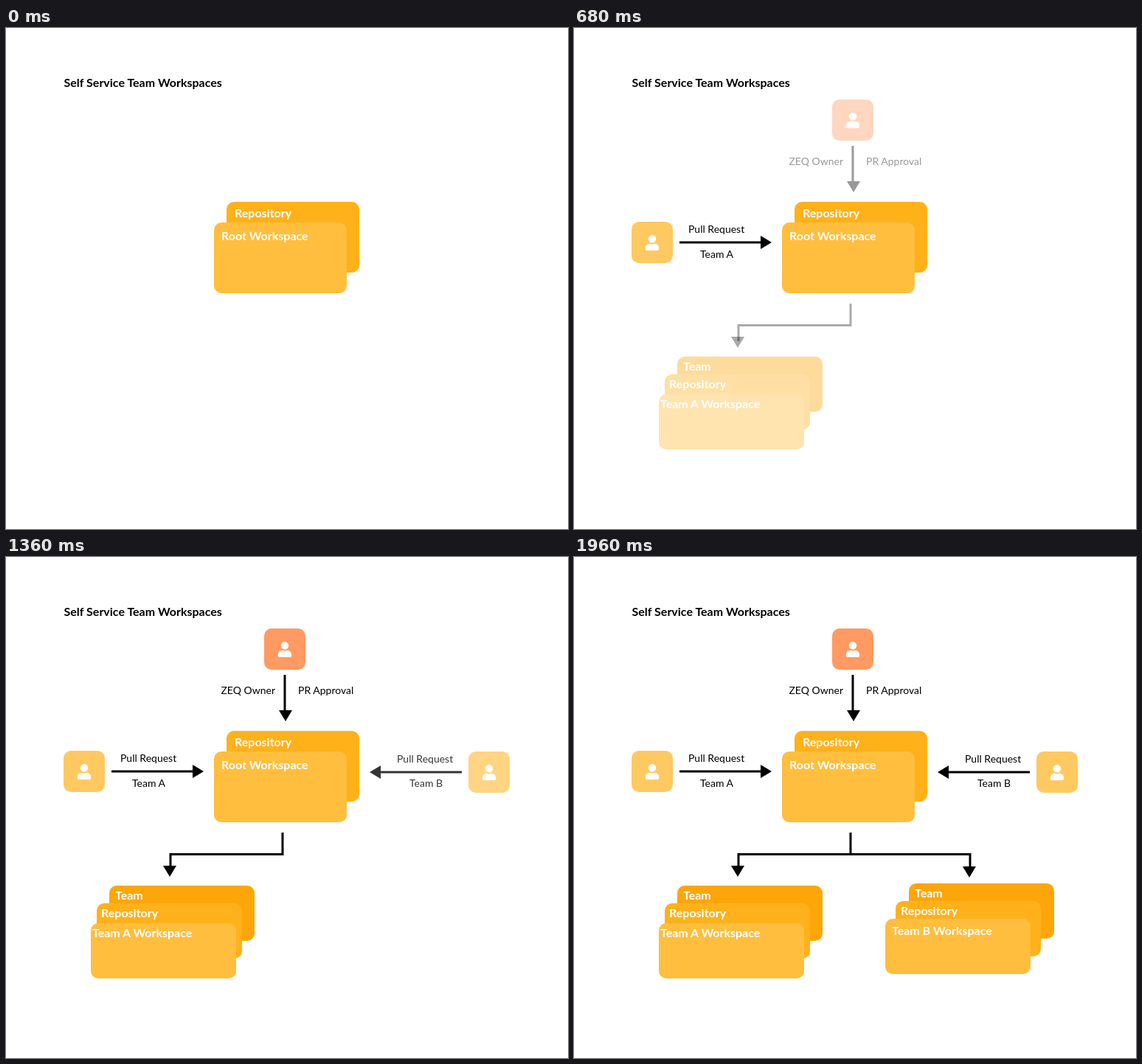
An HTML page for the animation above (2960 ms loop, 762 by 680 pixels).

```html
<!DOCTYPE html>
<html lang="en">
<head>
<meta charset="utf-8">
<title>Self Service Team Workspaces</title>
<style>
  html, body { margin: 0; width: 100%; height: 100%; overflow: hidden; background: #fff; }
  svg { display: block; width: 762px; height: 680px; }
  text { font: 14px Lato, sans-serif; }
  .bold { font-weight: 700; font-size: 16px; }
  .white { fill: #fff; }
  .line { fill: none; stroke: #000; stroke-width: 3; }
</style>
</head>
<body>
<svg viewBox="0 0 762 680">
  <defs>
    <g id="person" transform="translate(18.8 18) scale(.041)" fill="#fff">
      <circle cx="224" cy="128" r="128"/>
      <path d="M0 464v-42a134 134 0 0 1 134-134h17a175 175 0 0 0 146 0h17a134 134 0 0 1 134 134v42a48 48 0 0 1-48 48H48a48 48 0 0 1-48-48z"/>
    </g>
  </defs>
</svg>
<script>
const LOOP = 2960, STEP = 40;
const svg = document.querySelector('svg');
const fades = [];

const text = (x, y, str, cls = '', anchor = 'start') =>
  `<text x="${x}" y="${y}" class="${cls}" text-anchor="${anchor}">${str}</text>`;
const box = (x, y, w, h, color) =>
  `<rect x="${x}" y="${y}" width="${w}" height="${h}" rx="10" fill="${color}"/>`;
const card = (x, y, w, h, color, tx, ty, label) =>
  box(x, y, w, h, color) + text(tx, ty, label, 'bold white');
const user = (x, y, color) =>
  box(x, y, 56, 56, color) + `<use href="#person" x="0" y="0" transform="translate(${x} ${y})"/>`;
const line = d => `<path class="line" d="${d}"/>`;
// Arrowhead with its tip at x, y; angle 0 points down.
const head = (x, y, angle = 0) =>
  `<path d="M0 0l-9-15h18z" transform="translate(${x} ${y}) rotate(${angle})"/>`;

function add(markup, start, duration = 500) {
  svg.insertAdjacentHTML('beforeend', `<g>${markup}</g>`);
  if (start !== undefined) fades.push({ el: svg.lastElementChild, start, duration });
}

add(text(78.5, 80, 'Self Service Team Workspaces', 'bold') +
  card(299, 236, 180, 96, '#ffb11a', 310, 257, 'Repository') +
  card(282, 264, 180, 96, '#ffbe3d', 292, 288, 'Root Workspace'));

// Team A request
add(user(78, 263, '#ffc961') + line('M143 291H254') + head(268, 291, -90) +
  text(155, 278, 'Pull Request') + text(171, 312, 'Team A'), 0, 480);

// Approval and the Team A workspace
add(user(350, 97, '#ff9a62') + line('M378 160V209') + head(379, 223) +
  text(365, 186, 'ZEQ Owner', '', 'end') + text(396, 186, 'PR Approval'), 480);
add(line('M375 374V403.5H223V425'), 480, 600);
add(head(222, 434), 480, 600);
add(card(140, 446, 197, 75, '#fca609', 148, 465, 'Team') +
  card(123, 470, 197, 75, '#ffb11b', 129, 489, 'Repository') +
  card(115, 497, 197, 75, '#ffbe3d', 117, 516, 'Team A Workspace'), 480);

// Team B request
add(user(627, 264, '#ffc961') + line('M618 292H507') + head(493, 292, 90) +
  text(530, 279, 'Pull Request') + text(547, 312, 'Team B'), 965);

// Team B workspace
add(line('M376 403.5H537V420') + head(536, 435) +
  card(454, 443, 197, 75, '#fca609', 462, 462, 'Team') +
  card(436, 467, 197, 75, '#ffb11b', 443, 486, 'Repository') +
  card(422, 491, 197, 75, '#ffbe3d', 431, 513, 'Team B Workspace'), 1460);

function draw(now) {
  const t = Math.floor(now % LOOP / STEP) * STEP;
  for (const { el, start, duration } of fades)
    el.setAttribute('opacity', Math.min(1, Math.max(0, (t - start) / duration)));
}

const begin = performance.now();
function tick() {
  draw(performance.now() - begin);
  requestAnimationFrame(tick);
}
tick();
</script>
</body>
</html>
```
